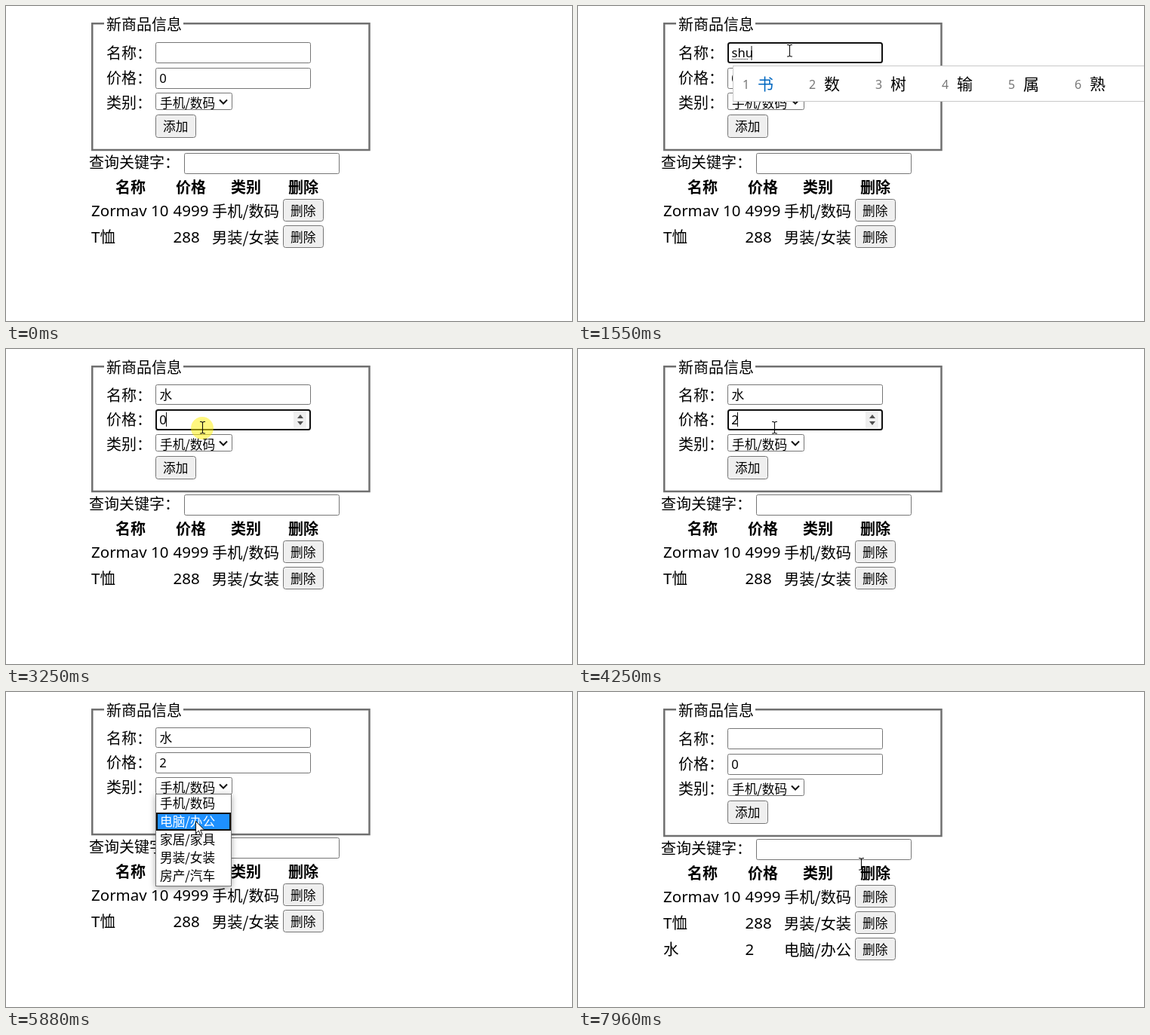
Write an HTML page that moves like this. It is 750 by 418 pixels and loops after 8000 ms.

```html
<!DOCTYPE html>
<html lang="zh-CN">
<head>
<meta charset="utf-8">
<style>
html, body { margin: 0; width: 100%; height: 100%; overflow: hidden; background: #fff; }
svg { display: block; font-family: "Noto Sans", "Noto Sans CJK SC", sans-serif; }
text { white-space: pre; }
.cjk { font-family: "Noto Sans CJK SC", sans-serif; }
.menu { filter: drop-shadow(0 2px 4px rgba(0,0,0,.35)); }
</style>
</head>
<body>
<svg id="stage" width="750" height="418" viewBox="0 0 750 418"></svg>
<script>
const LOOP = 8000, STEP = 77, SMALL = 16.67, GRAY = '#767676';
const stage = document.getElementById('stage');
const kinds = ['手机/数码', '电脑/办公', '家居/家具', '男装/女装', '房产/汽车'];

// Pointer moves: start time, end time, then the points passed on the way
const moves = [
  [150, 540, [521, 314], [430, 190], [280, 59]],
  [2713, 3020, [280, 59], [260, 104]],
  [4573, 5260, [260, 104], [411, 44], [287, 126]],
  [5413, 5880, [287, 126], [251, 171]],
  [6270, 6420, [251, 171], [240, 175]],
  [6493, 6800, [240, 175], [233, 164]],
  [7113, 7960, [233, 164], [509, 216], [375, 228]]
];
const clicks = [[615, 700], [3250, 3330], [5340, 5420], [6190, 6345], [6970, 7040]];
// Caret: from, to, x, row (0 name, 1 price)
const carets = [
  [615, 1080, 204, 0], [1310, 1460, 211, 0], [1460, 1550, 220, 0], [1550, 2010, 230, 0],
  [2010, 2490, 234, 0], [2490, 3020, 219.5, 0],
  [3250, 3790, 212.5, 1], [3870, 4250, 204, 1], [4250, 4650, 211.5, 1]
];
const typing = [
  [1310, 's', '是说上岁时三'], [1460, 'sh', '是上时说使事'],
  [1550, 'shu', '书数树输属熟'], [2010, 'shui', '水睡谁税说帨']
];

const within = (t, a, b) => t >= a && t < b;
const ease = p => p * p * (3 - 2 * p);

function pointer(t) {
  const move = moves.filter(m => t >= m[0]).pop();
  if (!move) return null;
  const [a, b, ...pts] = move;
  const now = t >= b ? b : t - (t - a) % STEP;
  const p = (now - a) / (b - a) * (pts.length - 1);
  const i = Math.min(Math.floor(p), pts.length - 2), k = ease(p - i);
  return [0, 1].map(j => pts[i][j] + (pts[i + 1][j] - pts[i][j]) * k);
}

const text = (x, y, s, size = 20, extra = '') =>
  `<text x="${x}" y="${y}" font-size="${size}" ${extra}>${s}</text>`;
const cjk = (x, y, s, size, extra = '') => text(x, y, s, size, 'class="cjk" ' + extra);
const box = (x, y, w, h, fill, stroke = GRAY, line = 1, r = 2) =>
  `<rect x="${x + line / 2}" y="${y + line / 2}" width="${w - line}" height="${h - line}" rx="${r}" fill="${fill}" stroke="${stroke}" stroke-width="${line}"/>`;
const field = (x, y, h, focused) =>
  focused ? box(x, y, 206, h, '#fff', '#101010', 2, 2.5) : box(x, y, 206, h, '#fff');
const button = (x, y, label, fill = '#efefef', h = 30) =>
  box(x, y, 54, h, fill, GRAY, 1, 3) + cjk(x + 10, y + h / 2 + 6.8, label, SMALL);

function spinner(y) {
  return `<rect x="381" y="${y + 3}" width="17" height="22" fill="#efefef"/>
    <path d="M386 ${y + 12}l4-5 4 5zM386 ${y + 16}l4 5 4-5z" fill="#505050"/>`;
}

function menu(active) {
  let s = '<g class="menu">' + box(198, 135, 101, 123, '#fff', GRAY, 1, 0) + '</g>';
  kinds.forEach((kind, i) => {
    const on = i === active;
    if (on) s += box(199, 136 + 24 * i, 99, 24, '#1e90ff', '#101010', 2, 0);
    s += cjk(204, 154.3 + 24 * i, kind, SMALL, on ? 'fill="#fff"' : '');
  });
  return s;
}

function candidates(words) {
  let s = box(205, 79, 560, 48, '#fff', '#c8c8c8', 1, 0);
  [...words].forEach((w, i) => {
    const x = 218 + i * 88;
    s += text(x, 110, i + 1, 16, 'fill="#777"') + cjk(x + 20, 111, w, 21, i ? '' : 'fill="#0067c0"');
  });
  return s;
}

function cursor(x, y, beam) {
  const at = `transform="translate(${x.toFixed(1)} ${y.toFixed(1)})"`;
  return beam
    ? `<path ${at} d="M-3 -7.5H-1L.5 -6.5 2 -7.5H4M.5 -6.5V7M-3 8H-1L.5 7 2 8H4" fill="none" stroke="#111" stroke-width="1.1"/>`
    : `<path ${at} d="M.5 .5V16.5L4.2 13 6.7 18.8 9.1 17.8 6.6 12.1H11.8Z" fill="#fff" stroke="#111"/>`;
}

function row(y, name, price, kind) {
  return text(113, y + 7, name, 20.5) + text(221.5, y + 7, price, 20.5) +
    cjk(273, y + 7.5, kind, 20.3) + button(367, y - 16, '删除');
}

function scene(t) {
  const filled = within(t, 2490, 7040), d = filled ? -2 : 0;
  const nameY = filled ? 47 : 48, priceY = 82 + d;
  const pos = pointer(t);
  const compose = within(t, 1310, 2490) && typing.filter(k => t >= k[0]).pop();
  const name = compose ? compose[1] : filled ? '水' : '';
  const price = within(t, 3870, 4250) ? '' : within(t, 4250, 7040) ? '2' : '0';
  const over = (x, y, w, h) => pos && within(pos[0], x, x + w) && within(pos[1], y, y + h);
  const nameFocus = within(t, 615, 3250), priceFocus = within(t, 3250, 5340);
  const pressed = within(t, 6970, 7040);
  const addFill = pressed ? '#f5f5f5' : over(198, 144 + d, 54, 30) ? '#e5e5e5' : '#efefef';

  let s = `<rect x="114.25" y="23.25" width="367.25" height="${167.75 + d}" fill="none" stroke="#707070" stroke-width="2.5"/>
    <rect x="130" y="20" width="105" height="8" fill="#fff"/>`;
  s += cjk(133, 31.5, '新商品信息');
  s += cjk(133, filled ? 68.5 : 69.5, '名称：') + cjk(133, 103.3 + d, '价格：') + cjk(133, 135.5 + d, '类别：');

  s += field(198, nameY, filled ? 27 : 28, nameFocus) + text(203.5, nameY + 19.5, name, SMALL);
  if (compose) s += `<path d="M204 ${nameY + 22.5}H${203 + name.length * 7.5}" stroke="#111" stroke-dasharray="1 1"/>`;
  s += field(198, priceY, 28, priceFocus) + text(203.3, priceY + 19.5, price, SMALL);
  if (priceFocus || over(198, priceY, 206, 28)) s += spinner(priceY);

  s += box(198, 115 + d, 102, 23, '#fff');
  s += cjk(204, 135 + d, kinds[within(t, 6270, 7040) ? 1 : 0], SMALL);
  s += `<path d="M283 ${124.5 + d}l5 5 5-5" fill="none" stroke="#111" stroke-width="2"/>`;
  s += button(198, 144 + d, '添加', addFill, 31);

  s += cjk(110, 214.5 + d, '查询关键字：') + field(236, 195 + d, 28, false);
  [['名称', 165], ['价格', 245], ['类别', 318], ['删除', 394]].forEach(([label, x]) =>
    s += cjk(x, 247.5 + d, label, 20, 'font-weight="700" text-anchor="middle"'));
  s += row(272 + d, 'Zormav 10', '4999', kinds[0]) + row(307 + d, 'T恤', '288', kinds[3]);
  if (t >= 7040) s += row(342, '水', '2', kinds[1]);

  const caret = carets.find(c => within(t, c[0], c[1]));
  if (caret) {
    const y = caret[3] ? priceY + 4 : nameY + 5;
    s += `<path d="M${caret[2]} ${y}v19" stroke="#111"/>`;
  }
  if (compose) s += candidates(compose[2]);
  if (within(t, 5340, 6270)) s += menu(pos[1] > 160 ? 1 : 0);

  if (pos) {
    const [x, y] = pos;
    if (clicks.some(c => within(t, c[0], c[1])))
      s += `<circle cx="${x}" cy="${y + 1}" r="15" fill="#fff000" fill-opacity=".5"/>`;
    const beam = over(198, nameY, 206, 28) || over(198, priceY, 206, 28) ||
      over(236, 195 + d, 206, 28) || t >= 7960;
    s += cursor(x, y, beam);
  }
  return s;
}

let last = '';
function frame() {
  const next = scene(performance.now() % LOOP);
  if (next !== last) stage.innerHTML = last = next;
  requestAnimationFrame(frame);
}
frame();
</script>
</body>
</html>
```
